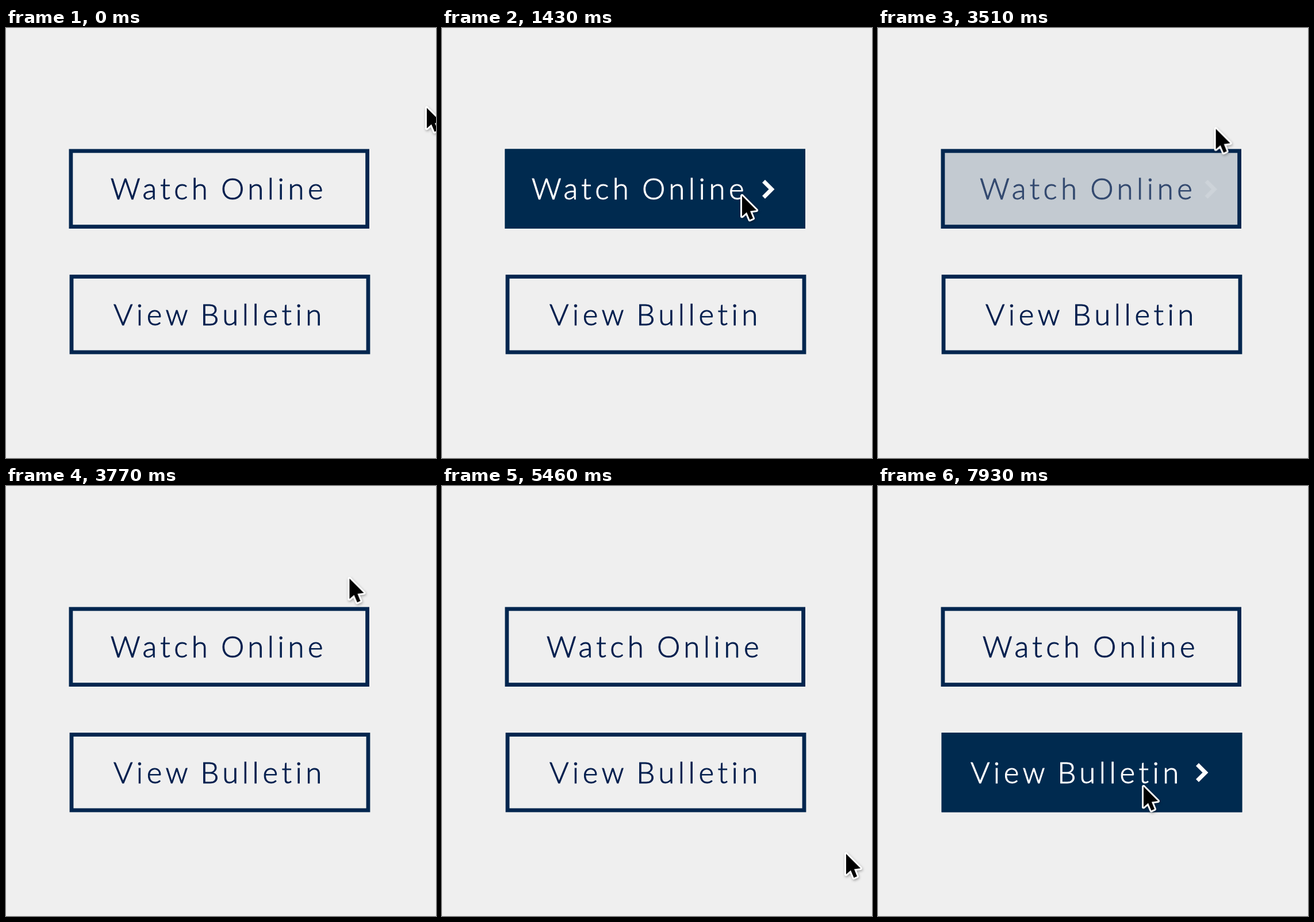
An HTML page that plays this animation: 748x748 px, repeating every 8 s.

```html
<!DOCTYPE html>
<html lang="en">
<head>
<meta charset="utf-8">
<title>Button hover</title>
<style>
html, body { margin: 0; height: 100%; overflow: hidden; background: #efefef; }
svg { display: block; width: 100vw; height: 100vh; }

/* Paused animations are driven by --t, so the picture steps like a screen recording. */
.fill, .label, .chevron, #cursor {
  animation: 8s ease infinite paused;
  animation-delay: var(--t, 0ms);
}
.frame { fill: none; stroke: #03264f; stroke-width: 6.8; }
.fill { fill: #002a4f; animation-name: var(--fade); }
.label {
  font: 300 51px Lato, "Open Sans", sans-serif;
  letter-spacing: 6.5px;
  text-anchor: middle;
  stroke-width: 1;
  animation-name: var(--slide);
}
.chevron { fill: none; stroke: #fff; stroke-width: 7; animation-name: var(--fade), var(--enter); }
#watch { --fade: fade1; --slide: slide1; --enter: enter1; }
#view { --fade: fade2; --slide: slide2; --enter: enter2; }

@keyframes fade1 {
  0%, 10.79%, 46.9%, 100% { opacity: 0; }
  17.04%, 40.65% { opacity: 1; }
}
@keyframes slide1 {
  0%, 10.79%, 46.9%, 100% { transform: none; fill: #05204f; stroke: #05204f; }
  17.04%, 40.65% { transform: translateX(-26px); fill: #fff; stroke: #fff; }
}
@keyframes enter1 {
  0%, 10.79%, 46.9%, 100% { transform: translateX(14px); }
  17.04%, 40.65% { transform: none; }
}
@keyframes fade2 {
  0%, 76.25% { opacity: 0; }
  82.5%, 100% { opacity: 1; }
}
@keyframes slide2 {
  0%, 76.25% { transform: none; fill: #05204f; stroke: #05204f; }
  82.5%, 100% { transform: translateX(-26px); fill: #fff; stroke: #fff; }
}
@keyframes enter2 {
  0%, 76.25% { transform: translateX(14px); }
  82.5%, 100% { transform: none; }
}

#cursor {
  animation-name: travel;
  animation-timing-function: linear;
  stroke: #fff;
  stroke-width: 6;
  stroke-linejoin: round;
  paint-order: stroke;
  filter: drop-shadow(1px 2px 2px rgba(0, 0, 0, .32));
}
@keyframes travel {
  0% { transform: translate(732px, 138px); animation-timing-function: ease-in; }
  10.5% { transform: translate(592px, 212px); }
  11.375% { transform: translate(528px, 251px); animation-timing-function: ease-out; }
  14% { transform: translate(508px, 287px); animation-timing-function: ease-in-out; }
  17.875%, 27% { transform: translate(522px, 291px); animation-timing-function: ease-in-out; }
  37.375% { transform: translate(536px, 247px); animation-timing-function: ease-in; }
  40.6% { transform: translate(566px, 206px); animation-timing-function: ease-out; }
  47.125% { transform: translate(597.5px, 160px); animation-timing-function: ease-in; }
  56.875% { transform: translate(695px, 141px); }
  60% { transform: translate(716px, 186px); }
  64% { transform: translate(722px, 410px); animation-timing-function: ease-out; }
  68.25% { transform: translate(703px, 639px); animation-timing-function: ease-in; }
  75.5% { transform: translate(632px, 575px); }
  78% { transform: translate(570px, 532px); animation-timing-function: ease-out; }
  82% { transform: translate(515px, 510px); animation-timing-function: ease-in-out; }
  99.125%, 100% { transform: translate(462px, 522px); }
}
</style>
</head>
<body>
<svg viewBox="0 0 748 748">
  <g id="watch">
    <rect class="frame" x="112.9" y="213.9" width="515.7" height="131.7"/>
    <rect class="fill" x="109.5" y="210.5" width="522.5" height="138.5"/>
    <g class="label">
      <text x="269.5" y="298">Watch</text>
      <text x="466" y="298">Online</text>
    </g>
    <path class="chevron" d="M559.5 266.5l14 14l-14 14"/>
  </g>
  <g id="view">
    <rect class="frame" x="114" y="432.5" width="516" height="131.5"/>
    <rect class="fill" x="110.6" y="429.1" width="522.8" height="138.3"/>
    <g class="label">
      <text x="255" y="516.5">View</text>
      <text x="447" y="516.5">Bulletin</text>
    </g>
    <path class="chevron" d="M555.5 484.5l14 14l-14 14"/>
  </g>
  <path id="cursor" d="M0 1V36.5L8 29.5L13.5 42.5L19 40L14 27.5L25 26Z"/>
</svg>
<script>
const LOOP = 8000, STEP = 130;
const root = document.documentElement;
function draw() {
  const t = performance.now() % LOOP;
  root.style.setProperty("--t", -Math.floor(t / STEP) * STEP + "ms");
  requestAnimationFrame(draw);
}
draw();
</script>
</body>
</html>
```
